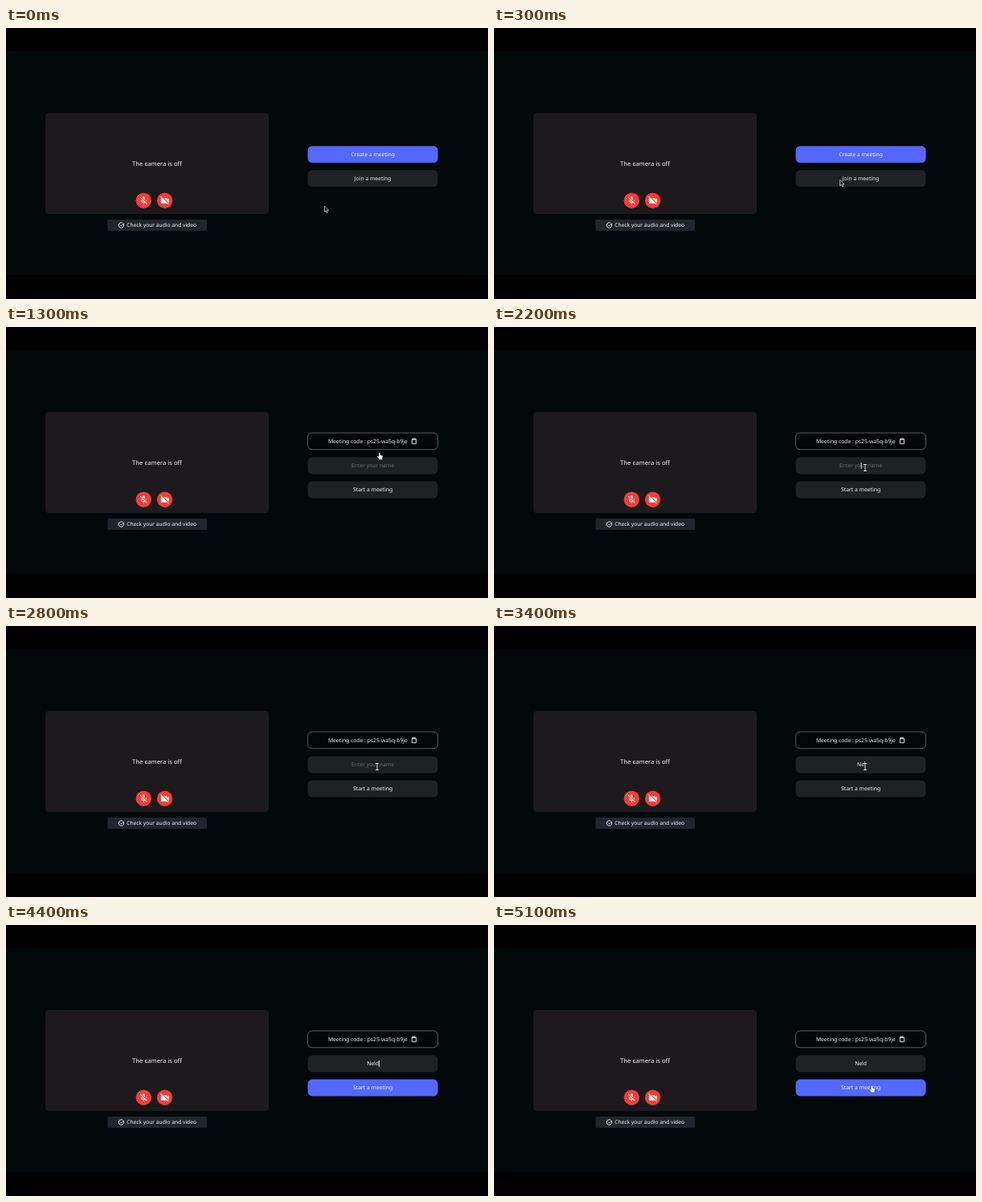
An HTML page that plays this animation: 600 by 338 pixels, repeating every 5300 ms.

```html
<!DOCTYPE html>
<html lang="en">
<head>
<meta charset="utf-8">
<title>Meeting lobby</title>
<style>
  html, body { margin: 0; width: 100%; height: 100%; overflow: hidden; background: #000; }
  svg { display: block; width: 100vw; height: 100vh; }
  text {
    font: 6.77px "Noto Sans", "Open Sans", sans-serif;
    fill: #f4f4f5;
    text-anchor: middle;
    text-rendering: geometricPrecision;
  }
  .big { font-size: 7.69px; }
  .small { font-size: 6.68px; }
  .hint { fill: #6c6f71; }
  .field { fill: #1f2224; }
  .primary { fill: #5468ff; }
  .outline { fill: #020608; stroke: #707375; stroke-width: .8; }
  .line { fill: none; stroke: #f4f4f5; stroke-width: .9; stroke-linecap: round; stroke-linejoin: round; }
  .red { fill: #f23d36; }
  .white { fill: #fff; }
</style>
</head>
<body>
<svg viewBox="0 0 600 338">
  <defs>
    <rect id="box" x="375.6" width="162" height="20.8" rx="5.5"/>
  </defs>

  <rect width="600" height="338"/>
  <rect y="29" width="600" height="279" fill="#03080b"/>

  <rect x="49" y="106" width="278" height="126" rx="4.5" fill="#1c1a1d"/>
  <text class="big" x="188" y="172">The camera is off</text>

  <circle class="red" cx="171.3" cy="215.2" r="9.7"/>
  <path class="white" transform="translate(165.3 209.2) scale(.5)" d="M19 11h-1.7c0 .74-.16 1.43-.43 2.05l1.23 1.23c.56-.98.9-2.09.9-3.28zm-4.02.17c0-.06.02-.11.02-.17V5c0-1.66-1.34-3-3-3S9 3.34 9 5v.18l5.98 5.99zM4.27 3L3 4.27l6.01 6.01V11c0 1.66 1.33 3 2.99 3 .22 0 .44-.03.65-.08l1.66 1.66c-.71.33-1.5.52-2.31.52-2.76 0-5.3-2.1-5.3-5.1H5c0 3.41 2.72 6.23 6 6.72V21h2v-3.28c.91-.13 1.77-.45 2.54-.9L19.73 21 21 19.73z"/>
  <circle class="red" cx="197.6" cy="215.2" r="9.7"/>
  <path class="white" transform="translate(191.2 208.8) scale(.55)" d="M21 6.5l-4 4V7c0-.55-.45-1-1-1H9.82L21 17.18zM3.27 2L2 3.27 4.73 6H4c-.55 0-1 .45-1 1v10c0 .55.45 1 1 1h12c.21 0 .39-.08.54-.18L19.73 21 21 19.73z"/>

  <rect x="126.5" y="239" width="123.5" height="14" rx="1" fill="#20252e"/>
  <path class="line" d="M146.6 244.8A3.3 3.3 0 1 1 145 243M142.2 245.8l1.3 1.3 3-3.2"/>
  <text class="small" x="193.6" y="248.4">Check your audio and video</text>

  <g id="lobby">
    <use href="#box" y="147.2" class="primary"/>
    <text x="456.6" y="160">Create a meeting</text>
    <use href="#box" y="177.2" class="field"/>
    <text x="456.6" y="190">Join a meeting</text>
  </g>

  <g id="form">
    <use href="#box" y="132" class="outline"/>
    <text x="450.4" y="145">Meeting code : ps25-wa5q-b9je</text>
    <path class="line" d="M506.6 139.9h-1.2v5.8h5v-5.8h-1.2M506.6 139.2h2.6v1.4h-2.6z"/>
    <use href="#box" y="162.6" class="field"/>
    <text id="hint" class="hint" x="456.6" y="175.4">Enter your name</text>
    <text id="name" x="456.6" y="175.4"></text>
    <rect id="caret" class="white" y="169" width=".8" height="8"/>
    <use id="start" href="#box" y="192.6"/>
    <text x="456.6" y="205.4">Start a meeting</text>
  </g>

  <g id="cursor">
    <path id="arrow" d="M0 0V7.4L1.7 5.9 2.9 8.5 4.1 8 3 5.4H5.2Z" fill="#15181a" stroke="#e4e4e4" stroke-width=".7"/>
    <path id="hand" d="M-.9 .8Q-.9 0 0 0T.9 .8V3L3.3 3.6Q4.1 3.8 4 4.7L3.5 7V8.7H-.9V7.6L-3 5.1Q-3.4 4.3-2.5 4.1L-.9 5.1Z" fill="#fff" stroke="#222" stroke-width=".4"/>
    <g id="beam" fill="none">
      <path d="M-1.9-4H1.9M0-4V4M-1.9 4H1.9" stroke="#111" stroke-width="2"/>
      <path d="M-1.9-4H1.9M0-4V4M-1.9 4H1.9" stroke="#fff" stroke-width=".9"/>
    </g>
  </g>
</svg>

<script>
const LOOP = 5300, STEP = 100, MID = 456.6;
const $ = id => document.getElementById(id);
const show = (id, on) => $(id).setAttribute('display', on ? 'inline' : 'none');
const within = (t, from, to) => t >= from && t < to;

const NAME = 'Neld';
const keyTimes = [3000, 3400, 3800, 4000];

// Each stop: time, x, y of the pointer's hot spot
const stops = [
  [0, 396.5, 222], [600, 465, 156.7],
  [1600, 465, 156.7], [1900, 462, 175.5],
  [4400, 462, 175.5], [4900, 475, 200.3],
  [5100, 470.3, 200.3], [LOOP, 470.3, 200.3]
];

function pointer(t) {
  const i = stops.findIndex(s => s[0] > t);
  const [t0, x0, y0] = stops[i - 1], [t1, x1, y1] = stops[i];
  const p = (t - t0) / (t1 - t0), e = p * p * (3 - 2 * p);
  return [x0 + (x1 - x0) * e, y0 + (y1 - y0) * e];
}

function shape(t, y) {
  if (within(t, 4400, 4500)) return '';
  if (t < 1300) return y < 168 ? 'hand' : 'arrow';
  if (t < 1700) return 'hand';
  if (within(y, 163, 183.5)) return 'beam';
  return y >= 192 ? 'hand' : 'arrow';
}

function render(t) {
  const filled = t >= 1300;
  show('lobby', !filled);
  show('form', filled);

  const typed = NAME.slice(0, keyTimes.filter(k => k <= t).length);
  $('name').textContent = typed;
  show('hint', !typed);
  const width = typed ? $('name').getComputedTextLength() : 0;
  $('caret').setAttribute('x', MID + width / 2 + .1);
  show('caret', within(t, 2200, 2800) || within(t, 3000, 4500));
  $('start').setAttribute('class', t >= 3800 ? 'primary' : 'field');

  const [x, y] = pointer(t), kind = shape(t, y);
  $('cursor').setAttribute('transform', `translate(${x} ${y})`);
  for (const id of ['arrow', 'hand', 'beam']) show(id, id === kind);
}

const begin = performance.now();
function tick() {
  const t = (performance.now() - begin) % LOOP;
  render(Math.floor(t / STEP) * STEP);
  requestAnimationFrame(tick);
}
tick();
</script>
</body>
</html>
```
